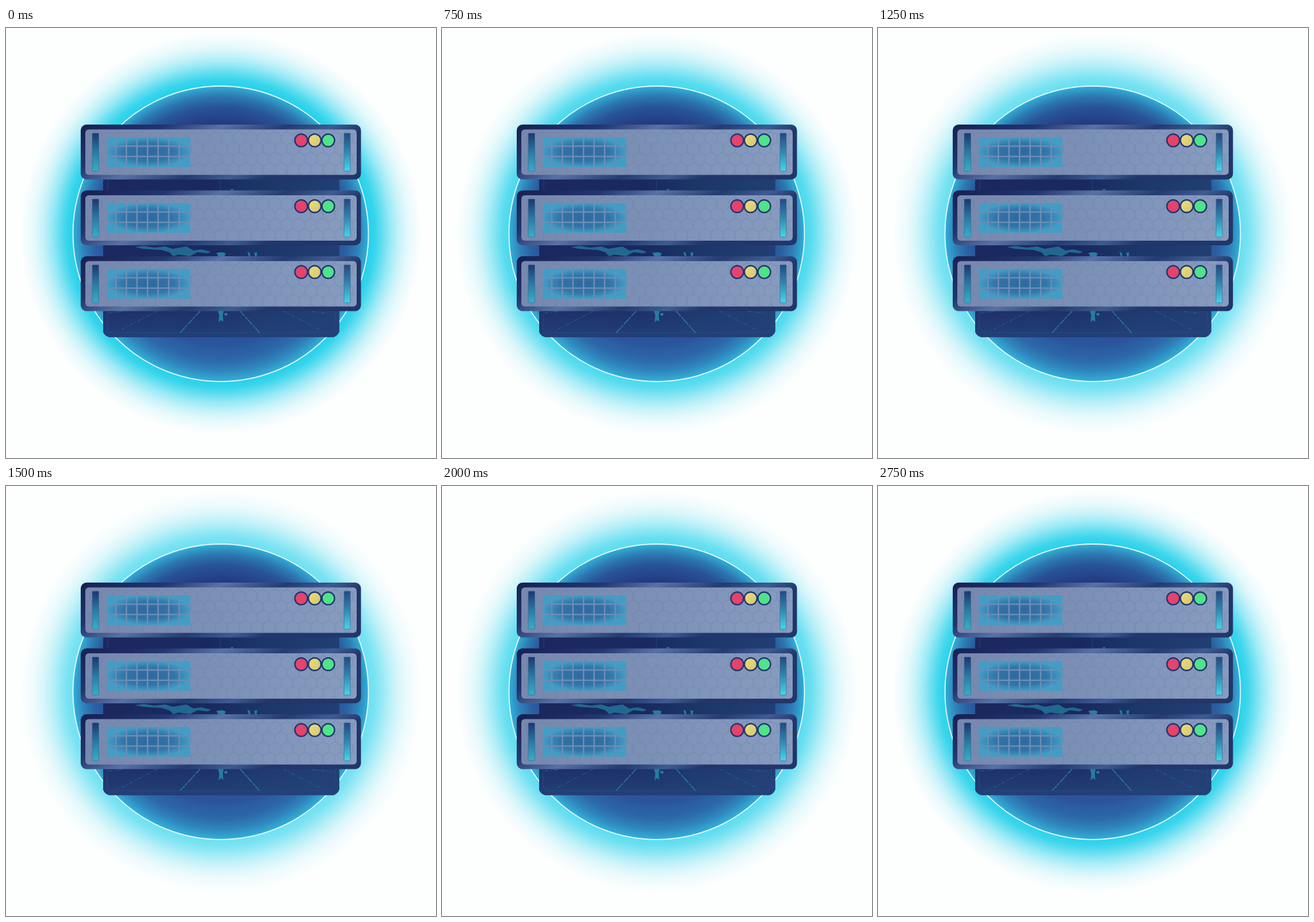
An HTML page for the animation above (3 s loop, 748 by 748 pixels).

```html
<!DOCTYPE html>
<html lang="en">
<head>
<meta charset="utf-8">
<title>Server rack</title>
<style>
  html, body { margin: 0; width: 100%; height: 100%; overflow: hidden; background: #fdfefe; }
  svg { display: block; width: 100%; height: 100%; }
</style>
</head>
<body>
<svg viewBox="0 0 748 748">
  <defs>
    <radialGradient id="glowFill">
      <stop offset=".73" stop-color="#20d0ea"/>
      <stop offset=".77" stop-color="#20d0ea" stop-opacity=".9"/>
      <stop offset=".807" stop-color="#20d0ea" stop-opacity=".69"/>
      <stop offset=".845" stop-color="#20d0ea" stop-opacity=".46"/>
      <stop offset=".89" stop-color="#20d0ea" stop-opacity=".25"/>
      <stop offset=".934" stop-color="#20d0ea" stop-opacity=".11"/>
      <stop offset="1" stop-color="#20d0ea" stop-opacity="0"/>
    </radialGradient>
    <linearGradient id="discFill" x2="0" y2="1">
      <stop offset=".2" stop-color="#243882"/>
      <stop offset=".75" stop-color="#2a539b"/>
    </linearGradient>
    <radialGradient id="discRim">
      <stop offset=".74" stop-color="#34b8de" stop-opacity="0"/>
      <stop offset=".86" stop-color="#34b8de" stop-opacity=".22"/>
      <stop offset=".93" stop-color="#34b8de" stop-opacity=".5"/>
      <stop offset="1" stop-color="#34b8de" stop-opacity=".92"/>
    </radialGradient>
    <linearGradient id="rackFill">
      <stop offset="0" stop-color="#1b2860"/>
      <stop offset=".45" stop-color="#19295f"/>
      <stop offset=".65" stop-color="#1b3567"/>
      <stop offset="1" stop-color="#213f74"/>
    </linearGradient>
    <linearGradient id="rackBase" x2="0" y2="1">
      <stop offset=".75" stop-color="#24427a" stop-opacity="0"/>
      <stop offset="1" stop-color="#24427a" stop-opacity=".9"/>
    </linearGradient>
    <linearGradient id="caseFill" x2=".9" y2=".35">
      <stop offset="0" stop-color="#171f52"/>
      <stop offset=".3" stop-color="#22366e"/>
      <stop offset=".5" stop-color="#5872a6"/>
      <stop offset=".72" stop-color="#233b70"/>
      <stop offset=".88" stop-color="#3f5b91"/>
      <stop offset="1" stop-color="#21366a"/>
    </linearGradient>
    <linearGradient id="plateFill">
      <stop offset="0" stop-color="#7888ae"/>
      <stop offset=".5" stop-color="#7c91b6"/>
      <stop offset="1" stop-color="#879cbf"/>
    </linearGradient>
    <pattern id="hexes" width="20.8" height="36" patternUnits="userSpaceOnUse">
      <path d="M0 6L10.4 0L20.8 6V18L10.4 24L0 18ZM10.4 24V36" fill="none" stroke="#657ba7" stroke-opacity=".5"/>
    </pattern>
    <linearGradient id="leftBar" x2="0" y2="1">
      <stop offset="0" stop-color="#1c3670"/>
      <stop offset=".5" stop-color="#287ba3"/>
      <stop offset="1" stop-color="#32b0c9"/>
    </linearGradient>
    <linearGradient id="rightBar" x2="0" y2="1">
      <stop offset="0" stop-color="#24487f"/>
      <stop offset=".5" stop-color="#3089b0"/>
      <stop offset="1" stop-color="#44d7e8"/>
    </linearGradient>
    <radialGradient id="ventFill">
      <stop offset="0" stop-color="#2f689e"/>
      <stop offset=".6" stop-color="#3374a6"/>
      <stop offset="1" stop-color="#429dc5"/>
    </radialGradient>
    <linearGradient id="yellow" x2="1" y2="1">
      <stop offset="0" stop-color="#f0df72"/>
      <stop offset="1" stop-color="#cfc67a"/>
    </linearGradient>

    <g id="unit">
      <rect x="130" y="168" width="487.5" height="95.5" rx="10" fill="url(#caseFill)"/>
      <rect x="138" y="176.5" width="472" height="79" rx="6" fill="url(#plateFill)"/>
      <rect x="138" y="176.5" width="472" height="79" rx="6" fill="url(#hexes)"/>
      <g stroke="#46699a" stroke-width=".8">
        <rect x="150" y="183" width="11.5" height="66" rx="1" fill="url(#leftBar)"/>
        <rect x="588" y="183" width="11" height="66" rx="1" fill="url(#rightBar)"/>
      </g>
      <rect x="175.5" y="190" width="145" height="52" rx="2" fill="url(#ventFill)"/>
      <g id="ventBars" fill="none" stroke="#6b8db8" stroke-width="2.6"/>
      <g stroke="#213771" stroke-width="2.5">
        <circle cx="513.5" cy="195.5" r="11" fill="#e5436c"/>
        <circle cx="537" cy="195.5" r="11" fill="url(#yellow)"/>
        <circle cx="560.5" cy="195.5" r="11" fill="#50e389"/>
      </g>
    </g>
  </defs>

  <circle id="glow" cx="374" cy="357.5" r="348" fill="url(#glowFill)"/>

  <g id="disc">
    <circle cx="373.5" cy="358" r="257" fill="url(#discFill)"/>
    <circle cx="373.5" cy="358" r="257" fill="url(#discRim)" stroke="#e4fbff" stroke-width="1.8"/>
  </g>

  <g id="rack">
    <path id="rackBody" d="M169 250H579.5V528Q577 535 570 537.5H179Q171 535 169 528Z" fill="url(#rackFill)"/>
    <use href="#rackBody" style="fill:url(#rackBase)"/>
    <path d="M169 250H579.5V528Q577 535 570 537.5H179Q171 535 169 528Z" fill="url(#rackBase)"/>
    <path d="M177 264V283M373 264V283M176 492V524L182 530H567L573 524V492" fill="none" stroke="#2a5286" stroke-opacity=".7"/>
    <g fill="#247ea0">
      <path d="M224 381L240 379L258 382L277 380L290 384L314 380L326 387L340 385L356 389L351 392L333 390L320 397L300 394L291 397L284 390L270 386L250 385L238 384Z" opacity=".75"/>
      <path d="M366 391L376 390L382 392L380 397H369ZM420 389L424 391L425 397H422ZM432 391L437 390L436 397H433ZM389 281L396 280L394 283Z"/>
      <path d="M368 491H379L377 500L378 511L374 508L370 512L371 500ZM380 496H385V500H380Z"/>
    </g>
    <g fill="none" stroke="#2b789d" stroke-width="1.6">
      <path d="M338 492L303 530M407 492L441 530" stroke-dasharray="12 2 5 1"/>
      <path d="M264 492L194 528M482 492L550 527M178 496L205 493M532 493L565 497" stroke-dasharray="7 4 2 3" stroke-width="1" opacity=".75"/>
    </g>
  </g>

  <use href="#unit"/>
  <use href="#unit" y="114.5"/>
  <use href="#unit" y="229"/>
</svg>

<script>
  const LOOP = 3000, STEP = 250, MIN_OPACITY = 0.66;
  const glow = document.getElementById('glow');

  const columns = Array.from({ length: 7 }, (_, i) => `M${191 + i * 18.4} 190V242`).join('');
  document.getElementById('ventBars').innerHTML =
    `<path d="${columns}M175.5 205.5H320.5M175.5 223.5H320.5"/>`;

  function draw(now) {
    const time = Math.floor((now % LOOP) / STEP) * STEP;
    const wave = (1 + Math.cos(2 * Math.PI * time / LOOP)) / 2;
    glow.style.opacity = MIN_OPACITY + (1 - MIN_OPACITY) * wave;
    requestAnimationFrame(draw);
  }
  draw(0);
</script>
</body>
</html>
```
